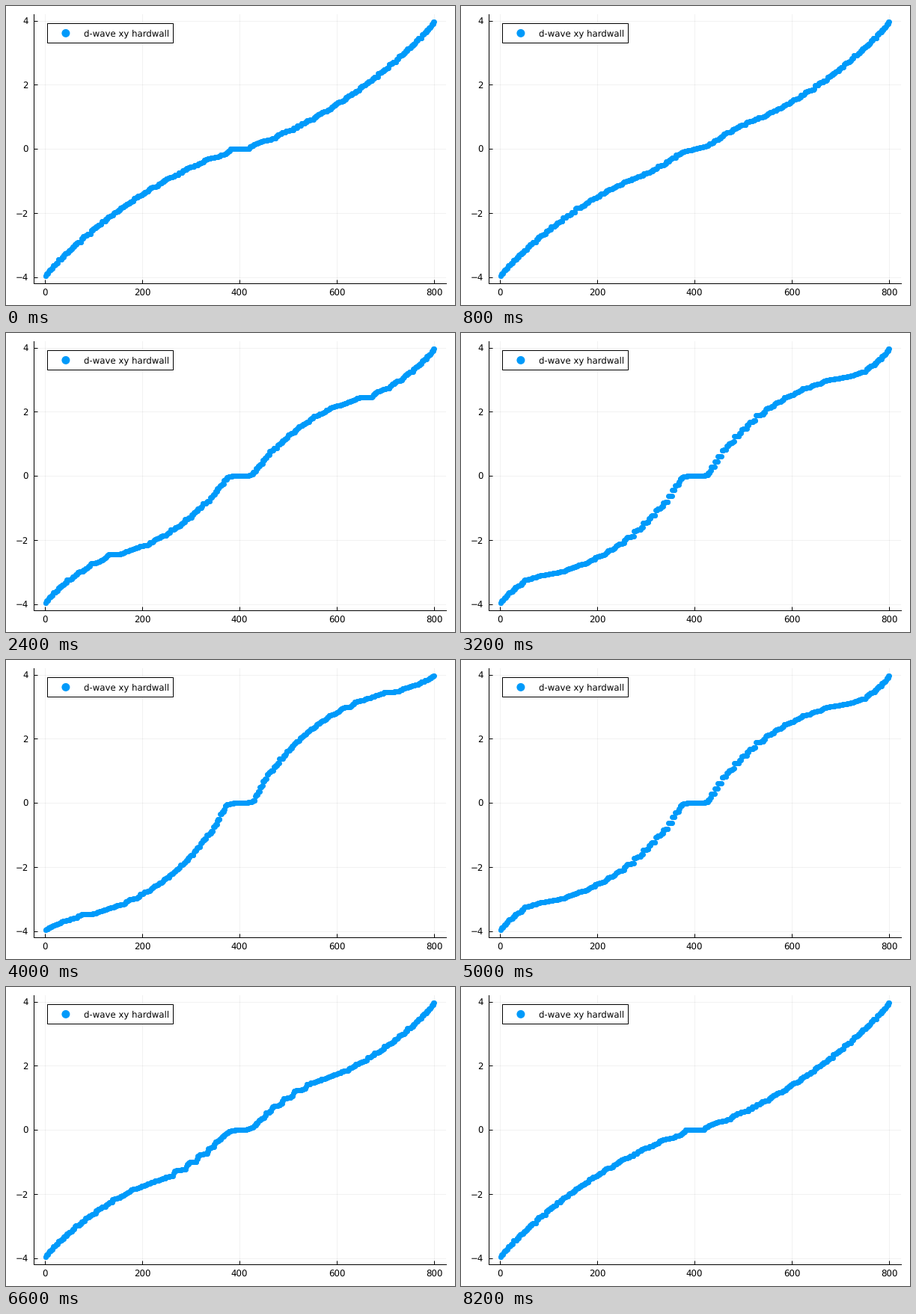
Write a matplotlib script that moves like this. It is 600 px wide and 400 px high and loops after 8400 ms.

```python
import numpy as np
import matplotlib.pyplot as plt
from matplotlib.animation import FuncAnimation
from matplotlib.patches import Circle, Rectangle

W, H, DPI = 600, 400, 100
SITES = 20          # lattice side
STEPS = 21          # pairing strengths from 0 to 1
BLUE = "#009afa"
PX = 72 / DPI       # points per pixel

plt.rcParams.update({
    "font.family": "DejaVu Sans",
    "font.size": 11.8 * PX,
    "text.hinting": "none",
    "axes.unicode_minus": True,
})


def spectrum(delta):
    """BdG energies of an open square lattice with d_xy pairing."""
    up = np.eye(SITES, k=1)
    hop, odd, one = up + up.T, up - up.T, np.eye(SITES)
    kinetic = -(np.kron(hop, one) + np.kron(one, hop))
    pairing = delta * np.kron(odd, odd)
    # chiral symmetry: energies are plus and minus the singular values
    e = np.linalg.svd(kinetic + 1j * pairing, compute_uv=False)
    return np.sort(np.concatenate([-e, e]))


levels = [spectrum(d) for d in np.linspace(0, 1, STEPS)]
index = np.arange(1, 2 * SITES**2 + 1)

fig = plt.figure(figsize=(W / DPI, H / DPI), dpi=DPI, facecolor="white")

left, right, top, bottom = 37.15, 587.7, 11.3, 371.1
ax = fig.add_axes([left / W, 1 - bottom / H,
                   (right - left) / W, (bottom - top) / H])
pad = 0.03 * (index[-1] - index[0])
ax.set_xticks(range(0, 801, 200))
ax.set_yticks(range(-4, 5, 2))
ax.set_xlim(index[0] - pad, index[-1] + pad)
ax.spines[["top", "right"]].set_visible(False)
ax.spines[["left", "bottom"]].set_linewidth(PX)
ax.tick_params(direction="in", length=5 * PX, width=PX)
ax.tick_params(axis="x", pad=7.8 * PX)
ax.tick_params(axis="y", pad=7.2 * PX)
ax.grid(color="black", alpha=0.05, linewidth=PX)
ax.set_axisbelow(True)
dots = ax.scatter(index, levels[0], s=(7 * PX) ** 2, c=BLUE,
                  linewidths=0, zorder=3)

# legend, laid out in pixels
key = fig.add_axes([0, 0, 1, 1], zorder=5)
key.set(xlim=(0, W), ylim=(H, 0))
key.axis("off")
key.add_patch(Rectangle((55, 23), 168.4, 26, facecolor="white",
                        edgecolor="black", linewidth=PX))
key.add_patch(Circle((79.9, 36.4), 5.5, facecolor=BLUE, linewidth=0))
key.text(103.5, 40.4, "d-wave xy hardwall", va="baseline")


def draw(i):
    e = levels[min(i, 2 * STEPS - 1 - i)]
    dots.set_offsets(np.column_stack([index, e]))
    ax.set_ylim(1.06 * e[0], 1.06 * e[-1])
    return dots,


anim = FuncAnimation(fig, draw, frames=2 * STEPS, interval=200,
                     repeat=True, repeat_delay=0, blit=False)
plt.show()
```
